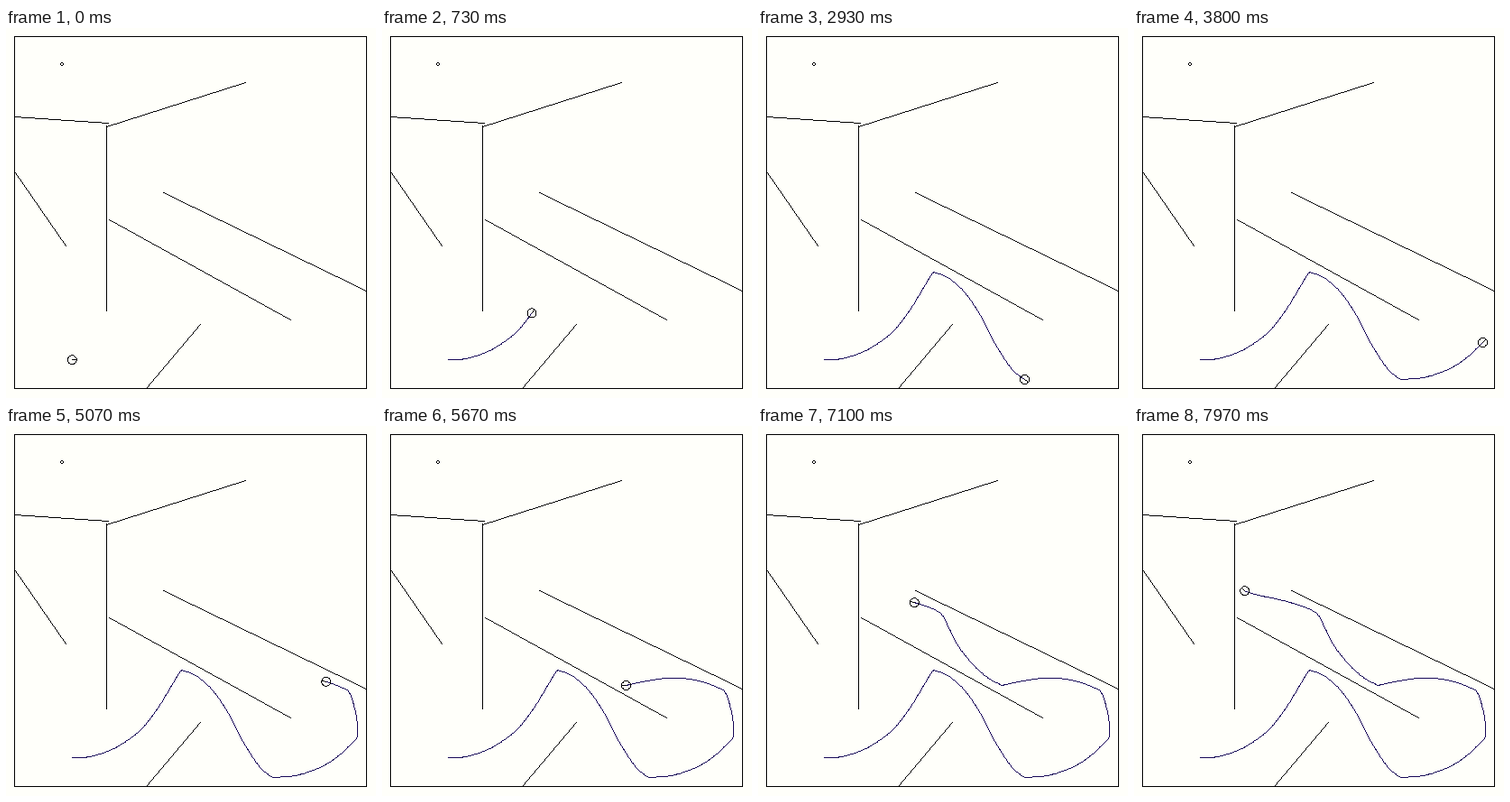
A matplotlib script for the animation above (8000 ms loop, 410x410 px).

```python
import numpy as np
import matplotlib.pyplot as plt
from matplotlib.animation import FuncAnimation

SIZE, FRAMES, LOOP_MS = 410, 240, 8000
SPEED = 5.29            # pixels per frame while driving
PAPER = (255, 255, 250)
INK = (0, 0, 0)
TRAIL = (24, 8, 88)

WALLS = [
    (9, 9, 399, 9), (399, 9, 399, 399), (399, 399, 9, 399), (9, 399, 9, 9),
    (9, 98, 113, 105), (111, 109, 265, 60), (111, 108, 111, 313),
    (114, 212, 315, 323), (174, 182, 399, 291), (10, 160, 66, 241),
    (155, 399, 215, 328),
]

# Each leg: frame at which a given knot is reached, knot index, knots.
LEGS = [
    (22, 5, [(71.7, 367.4), (92, 366), (112, 360), (131, 350), (150, 335),
             (168.5, 311), (191, 274), (194, 270)]),
    (64, 2, [(194, 270), (209, 275.5), (228.3, 292.3), (246, 318),
             (262, 349), (283, 380), (295, 389)]),
    (114, 4, [(295, 389), (320, 387), (340, 381), (360, 371), (386, 348),
              (389, 344)]),
    (126, 0, [(389, 344), (388, 322), (381, 297), (378, 292)]),
    (152, 1, [(378, 292), (354.2, 282.8), (322, 278.6), (288, 283),
              (270, 287)]),
    (190, 3, [(270, 287), (258, 281), (245, 271), (222, 244.2), (205, 211),
              (202, 207)]),
    (207, 0, [(202, 207), (193, 202), (165, 193), (133, 186),
              (122.3, 182.3)]),
]
FINAL_HEADING = np.radians(-135)
SAMPLES = 16


def smooth(knots):
    """Centripetal Catmull-Rom curve through the knots."""
    p = np.array(knots, float)
    p = np.vstack([2 * p[0] - p[1], p, 2 * p[-1] - p[-2]])
    u = np.linspace(0, 1, SAMPLES, endpoint=False)[:, None]
    spans = []
    for a, b, c, d in zip(p, p[1:], p[2:], p[3:]):
        gaps = [np.sqrt(np.hypot(*(r - q))) for q, r in ((a, b), (b, c), (c, d))]
        t0, t1, t2, t3 = np.cumsum([0] + gaps)
        t = t1 + u * (t2 - t1)

        def mix(q, r, lo, hi):
            return ((hi - t) * q + (t - lo) * r) / (hi - lo)

        ab, bc, cd = mix(a, b, t0, t1), mix(b, c, t1, t2), mix(c, d, t2, t3)
        spans.append(mix(mix(ab, bc, t0, t2), mix(bc, cd, t1, t3), t1, t2))
    return np.vstack(spans + [p[-2:-1]])


class Leg:
    def __init__(self, frame, knot, knots):
        self.curve = smooth(knots)
        step = np.diff(self.curve, axis=0)
        self.dist = np.append(0, np.cumsum(np.hypot(*step.T)))
        self.angle = np.unwrap(np.arctan2(step[:, 1], step[:, 0]))
        self.start = frame - self.dist[knot * SAMPLES] / SPEED
        self.end = self.start + self.dist[-1] / SPEED

    def at(self, frame):
        s = np.clip((frame - self.start) * SPEED, 0, self.dist[-1])
        x, y = (np.interp(s, self.dist, self.curve[:, k]) for k in (0, 1))
        return x, y, np.interp(s, self.dist[:-1], self.angle)


legs = [Leg(*leg) for leg in LEGS]


def pose(frame):
    """Position and heading; the robot turns on the spot between legs."""
    k = max((i for i, leg in enumerate(legs) if leg.start <= frame), default=0)
    leg = legs[k]
    x, y, heading = leg.at(frame)
    if frame > leg.end:
        last = k == len(legs) - 1
        target = FINAL_HEADING if last else legs[k + 1].angle[0]
        until = FRAMES - 1 if last else legs[k + 1].start
        turn = (target - heading + np.pi) % (2 * np.pi) - np.pi
        heading += turn * (frame - leg.end) / (until - leg.end)
    return x, y, heading


def line(img, x0, y0, x1, y1, color):
    n = int(np.ceil(max(abs(x1 - x0), abs(y1 - y0)))) + 1
    xs = np.floor(np.linspace(x0, x1, n) + 0.5).astype(int)
    ys = np.floor(np.linspace(y0, y1, n) + 0.5).astype(int)
    img[ys, xs] = color


def ring(img, x, y, r, sides=16):
    a = np.linspace(0, 2 * np.pi, sides + 1) + np.pi / sides
    px, py = x + r * np.cos(a), y + r * np.sin(a)
    for i in range(sides):
        line(img, px[i], py[i], px[i + 1], py[i + 1], INK)


base = np.full((SIZE, SIZE, 3), PAPER, np.uint8)
for wall in WALLS:
    line(base, *wall, INK)
ring(base, 61.5, 39.5, 1.6, 8)

poses = [pose(f) for f in range(FRAMES)]

fig = plt.figure(figsize=(5, 5), dpi=SIZE // 5)
ax = fig.add_axes([0, 0, 1, 1])
ax.axis("off")
view = ax.imshow(base, interpolation="nearest", aspect="auto")


def draw(frame):
    img = base.copy()
    for a, b in zip(poses[:frame], poses[1:frame + 1]):
        line(img, *a[:2], *b[:2], TRAIL)
    x, y, heading = poses[frame]
    ring(img, x, y, 5)
    line(img, x, y, x + 5 * np.cos(heading), y + 5 * np.sin(heading), INK)
    view.set_data(img)
    return [view]


anim = FuncAnimation(fig, draw, frames=FRAMES, interval=LOOP_MS / FRAMES,
                     repeat=True, repeat_delay=0)
plt.show()
```
